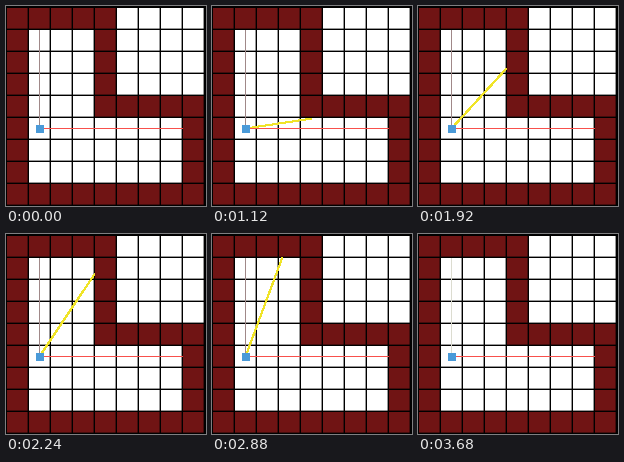
Recreate the animation shown at these times as a matplotlib script. Size 200x200 px, loop 3760 ms.

```python
import numpy as np
import matplotlib.pyplot as plt
from matplotlib.animation import FuncAnimation
from matplotlib.patches import Rectangle

SIZE, DPI = 200, 100
PX = 72 / DPI
FRAMES, INTERVAL = 47, 80
CELL, TILE = 22, 20.6
LEFT, TOP = 1, 2
EYE = (33.5, 122.5)

COLORS = {"#": "#701414", ".": "white"}
LEVEL = [
    "#####....",
    "#...#....",
    "#...#....",
    "#...#....",
    "#...#####",
    "#.......#",
    "#.......#",
    "#.......#",
    "#########",
]

# The ray's tip slides along the room's walls between these corners.
KEY_FRAMES = [0, 7, 15, 31, 46]
KEY_X = [177, 176.5, 88.5, 88.5, 34]
KEY_Y = [122.5, 113.5, 112.5, 23.5, 23.5]

fig = plt.figure(figsize=(SIZE / DPI, SIZE / DPI), dpi=DPI, facecolor="black")
ax = fig.add_axes([0, 0, 1, 1])
ax.set_xlim(0, SIZE)
ax.set_ylim(SIZE, 0)
ax.axis("off")


def line(xs, ys, color, z, smooth=True):
    return ax.plot(xs, ys, color=color, lw=PX, zorder=z, snap=False,
                   antialiased=smooth, solid_capstyle="butt")[0]


def block(x, y, size, color, z):
    ax.add_patch(Rectangle((x, y), size, size, fc=color, ec="none", lw=0,
                           zorder=z, snap=False))


# The black background shows between the tiles as grid lines.
for row, cells in enumerate(LEVEL):
    for col, cell in enumerate(cells):
        block(LEFT + col * CELL, TOP + row * CELL, TILE, COLORS[cell], 1)

upright = line([EYE[0]] * 2, [24, EYE[1]], "#a08888", 3)
ray = line([], [], "#f0e428", 4, smooth=False)
line([EYE[0], 177], [EYE[1]] * 2, "#f8504c", 5)
block(30, 119, 8, "#4a9ad8", 6)


def update(frame):
    tip_x = np.interp(frame, KEY_FRAMES, KEY_X)
    tip_y = np.interp(frame, KEY_FRAMES, KEY_Y)
    aligned = frame == FRAMES - 1
    ray.set_data([EYE[0], tip_x], [EYE[1], tip_y])
    ray.set_visible(0 < frame and not aligned)
    upright.set_color("#dcdcd0" if aligned else "#a08888")
    return ray, upright


anim = FuncAnimation(fig, update, frames=FRAMES, interval=INTERVAL,
                     repeat=True, repeat_delay=0, blit=False)
plt.show()
```
